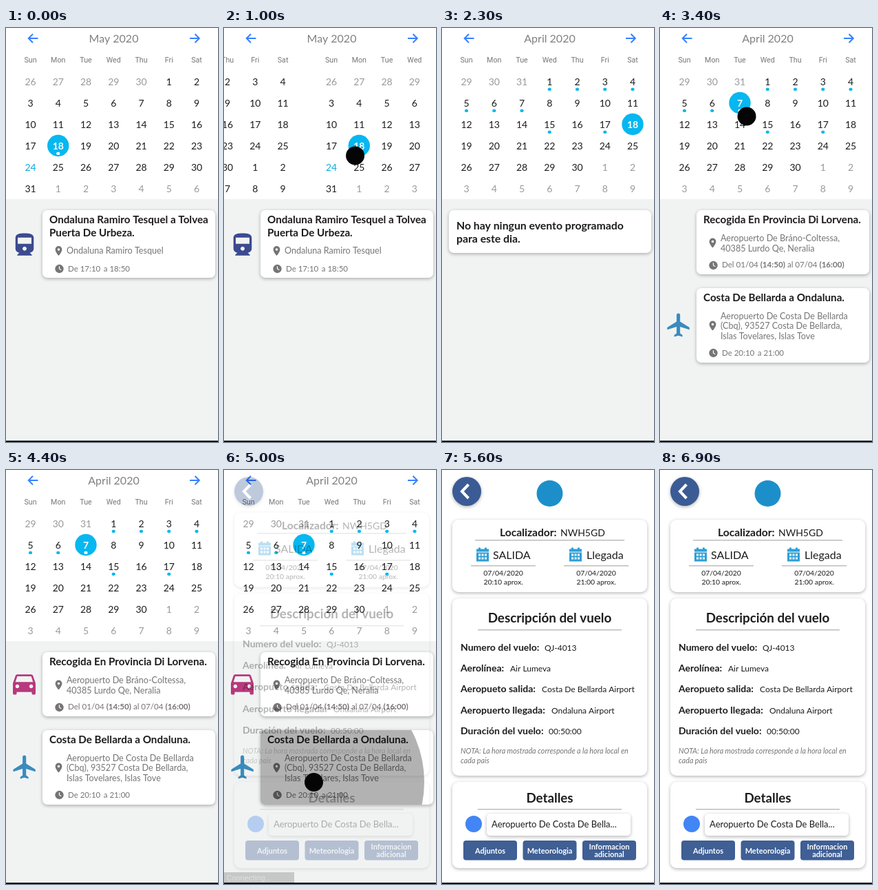
Animation of 308x600 px, one loop 7100 ms. Source, as an HTML page with a canvas:

```html
<!DOCTYPE html>
<html lang="es">
<head>
<meta charset="utf-8">
<title>Agenda de viajes</title>
<style>
  html, body { margin: 0; width: 308px; height: 600px; overflow: hidden; background: #fff; }
  canvas { position: absolute; left: 0; top: 0; }
</style>
</head>
<body>
<canvas id="agenda" width="308" height="600"></canvas>
<canvas id="detail" width="308" height="600"></canvas>
<script>
const LOOP = 7100, STEP = 100, PAGE = 312;
const CYAN = '#06b7f0', GREY = '#757575', INK = '#1c1c1c', NAVY = '#3f5f95';
const agenda = document.getElementById('agenda').getContext('2d');
const detail = document.getElementById('detail').getContext('2d');
let c = agenda;

const icons = {
  train: 'M12 2c-4.4 0-8 .5-8 4v9.5C4 17.4 5.6 19 7.5 19L5.5 21v.5h13V21l-2-2c1.9 0 3.5-1.6 3.5-3.5V6c0-3.5-3.6-4-8-4zM6 5.8h12v5.4H6zM12 13.7a1.8 1.8 0 1 0 .01 0z',
  car: 'M18.9 6c-.2-.6-.8-1-1.4-1h-11c-.7 0-1.2.4-1.4 1L3 12v8c0 .6.4 1 1 1h1c.6 0 1-.4 1-1v-1h12v1c0 .6.4 1 1 1h1c.6 0 1-.4 1-1v-8zM6.5 13a1.5 1.5 0 1 0 .01 0zM17.5 13a1.5 1.5 0 1 0 .01 0zM5 11l1.5-4.5h11L19 11z',
  plane: 'M21 16v-2l-8-5V3.5a1.5 1.5 0 0 0-3 0V9l-8 5v2l8-2.5V19l-2 1.5V22l3.5-1 3.5 1v-1.5L13 19v-5.5z',
  pin: 'M12 2a7 7 0 0 0-7 7c0 5.2 7 13 7 13s7-7.8 7-13a7 7 0 0 0-7-7zM12 6.5a2.5 2.5 0 1 1-.01 0z',
  clock: 'M12 2a10 10 0 1 0 .01 0zM11 6h2v5.5l4 2.6-1 1.6-5-3.2z',
  calendar: 'M3 4h3V2h3v2h6V2h3v2h3v4H3zM3 9h18v13H3zM6 11h3v3H6zM10.5 11h3v3h-3zM15 11h3v3h-3zM6 16h3v3H6zM10.5 16h3v3h-3zM15 16h3v3h-3z'
};

function icon(name, x, y, scale, color) {
  c.save();
  c.translate(x, y);
  c.scale(scale, scale);
  c.translate(-12, -12);
  c.fillStyle = color;
  c.fill(new Path2D(icons[name]), 'evenodd');
  c.restore();
}

function text(str, x, y, size, color = INK, style = '', align = 'left', family = 'Lato') {
  c.font = `${style} ${size}px ${family}, sans-serif`;
  c.fillStyle = color;
  c.textAlign = align;
  c.fillText(str, x, y);
  return x + c.measureText(str).width;
}

function rect(x, y, w, h, color) {
  c.fillStyle = color;
  c.fillRect(x, y, w, h);
}

function disc(x, y, r, color) {
  c.fillStyle = color;
  c.beginPath();
  c.arc(x, y, r, 0, 7);
  c.fill();
}

function stroke(points, color, width) {
  c.strokeStyle = color;
  c.lineWidth = width;
  c.stroke(new Path2D(points));
}

function box(x, y, w, h, r, color) {
  c.fillStyle = color;
  c.beginPath();
  c.roundRect(x, y, w, h, r);
  c.fill();
}

function shadowed(draw) {
  c.save();
  c.shadowColor = 'rgba(0,0,0,.3)';
  c.shadowBlur = 5;
  c.shadowOffsetY = 1.5;
  draw();
  c.restore();
}

const card = (x, y, w, h, r = 7) => shadowed(() => box(x, y, w, h, r, '#fff'));
const smooth = p => (p = Math.min(1, Math.max(0, p)), p * p * (3 - 2 * p));

// month is zero-based; a page that is not ready has no grey days
function monthPage(x0, month, { selected, dots = [], marked, today, ready = true }) {
  const lead = new Date(2020, month, 1).getDay();
  ['Sun', 'Mon', 'Tue', 'Wed', 'Thu', 'Fri', 'Sat'].forEach((name, i) =>
    text(name, x0 + 35.5 + 40.25 * i, 50, 10.7, '#777', '', 'center', 'Roboto'));
  for (let i = 0; i < 42; i++) {
    const date = new Date(2020, month, 1 - lead + i), day = date.getDate();
    const own = date.getMonth() === month;
    const x = x0 + 35.5 + 40.25 * (i % 7), y = 78 + 31 * Math.floor(i / 7);
    const on = own && day === selected;
    if (on) disc(x, y - .5, 15.7, CYAN);
    const color = on ? '#fff' : !own && ready ? '#999' : own && day === today ? '#0ba9dc' : INK;
    text(day, x, y + 5.3, 14, color, on ? 'bold' : '', 'center');
    if (on ? marked : own && dots.includes(day)) box(x - 2.5, y + 8.7, 5, 4.4, 1.8, on ? '#fff' : CYAN);
  }
}

function header(title) {
  text(title, 156.5, 20.5, 16, '#808080', '', 'center');
  stroke('M46.5 15H33M39 8.7L32.7 15L39 21.3', '#3880ff', 2);
  stroke('M267 15H280.5M274.5 8.7L280.8 15L274.5 21.3', '#3880ff', 2);
}

function eventCard(y, h, titles, address, pinY, addressY, clockY) {
  card(53, y, 251, h);
  titles.forEach((line, i) => text(line, 63, y + 19 + 18.5 * i, 15.2, INK, 'bold'));
  icon('pin', 76.5, pinY, .7, GREY);
  address.forEach((line, i) => text(line, 88, addressY + 14.6 * i, 12.6, GREY));
  icon('clock', 77.5, clockY, .62, GREY);
}

function hours(from, to, y) {
  text('De ' + from, 90, y, 11.5, GREY);
  text('a ' + to, 180, y, 11.5, GREY, '', 'right');
}

function trainCard() {
  icon('train', 27, 314, 1.66, '#3c4a8f');
  eventCard(264, 98, ['Ondaluna Ramiro Tesquel a Tolvea', 'Puerta De Urbeza.'],
    ['Ondaluna Ramiro Tesquel'], 323, 327.3, 349);
  hours('17:10', '18:50', 352.7);
}

function emptyCard() {
  card(10, 264, 294, 62);
  text('No hay ningun evento programado', 21, 291.5, 15.8, INK, 'bold');
  text('para este dia.', 21, 310.5, 15.8, INK, 'bold');
}

function tripCards(t) {
  if (t >= 3500) icon('car', 26.5, 309, 1.83, '#b8397d');
  eventCard(264, 93, ['Recogida En Provincia Di Lorvena.'],
    ['Aeropuerto De Bráno-Coltessa,', '40385 Lurdo Qe, Neralia'], 311.5, 309.3, 344);
  let x = 90;
  [['Del 01/04 ', ''], ['(14:50)', 'bold'], [' al 07/04 ', ''], ['(16:00)', 'bold']]
    .forEach(([part, style]) => x = text(part, x, 347.3, 11.6, GREY, style));

  icon('plane', 27.5, 430.5, 1.7, '#3a8bbd');
  eventCard(377, 108, ['Costa De Bellarda a Ondaluna.'],
    ['Aeropuerto De Costa De Bellarda', '(Cbq), 93527 Costa De Bellarda,', 'Islas Tovelares, Islas Tove'],
    431.5, 421.7, 471);
  hours('20:10', '21:00', 474.7);

  if (t > 4800) {
    c.save();
    c.beginPath();
    c.roundRect(53, 377, 251, 108, 7);
    c.clip();
    disc(131, 452, (t - 4800) * .8, 'rgba(0,0,0,.3)');
    c.restore();
  }
}

function cursor(t, offset) {
  let x, y, alpha = 1;
  if (t >= 500 && t < 1300) {
    x = 70 + offset;
    y = 185;
  } else if (t >= 2500 && t < 3800) {
    const p = smooth((t - 2500) / 600);
    x = 200 - 74 * p;
    y = 336 - 208 * p;
    alpha = Math.min(1, (3800 - t) / 300);
  } else if (t >= 4800 && t < 5400) {
    x = 130.5;
    y = 452.5;
  } else return;
  c.globalAlpha = alpha;
  disc(x, y, 13.5, '#050505');
  c.globalAlpha = 1;
}

function drawAgenda(t) {
  c = agenda;
  rect(0, 0, 308, 600, '#f1f3f3');
  rect(0, 0, 308, 248, '#fff');
  const offset = PAGE * smooth((t - 500) / 1180);
  header(t < 1700 ? 'May 2020' : 'April 2020');
  if (offset < PAGE) monthPage(offset, 4, { selected: t < 1400 ? 18 : 0, marked: true, today: 24 });
  if (offset > 0) monthPage(offset - PAGE, 3, {
    selected: t < 1900 ? 0 : t < 3200 ? 18 : 7,
    marked: t >= 3200,
    dots: t < 2100 ? [] : [1, 2, 3, 4, 5, 6, 7, 15, 17],
    ready: t >= 1700
  });
  if (t < 1800) trainCard();
  else if (t < 3200) emptyCard();
  else if (t >= 3400) tripCards(t);
  cursor(t, offset);
  // keeps the back button opaque while the pages blend
  if (t >= 5100) disc(36, 31, 21, '#fff');
  rect(0, 598, 308, 2, '#111');
}

function drawDetail(loaded) {
  c = detail;
  // before the header picture arrives, the upper rows sit higher
  const Y = y => loaded ? y : y - Math.max(0, 420 - y) * .03;
  const rule = (x, y, w) => rect(x, Math.round(Y(y)), w, 1.5, '#bdbdbd');
  const panel = (top, bottom) => card(15, Y(top), 283, Y(bottom) - Y(top), 9);
  rect(0, 0, 308, 600, '#fff');

  shadowed(() => disc(36, 31, 21, '#3b5b95'));
  stroke('M38.5 21L29 31L38.5 41', '#fff', 4);
  if (loaded) disc(156.5, 34, 19, '#1c8fcb');

  panel(72, 177);
  text('Localizador:', 84, Y(95.5), 15.6, INK, 'bold');
  text('NWH5GD', 172, Y(95.5), 14);
  rule(48, 101, 217);
  [[59, 'SALIDA', 74, '20:10'], [194, 'Llegada', 210, '21:00']].forEach(([x, name, nameX, hour]) => {
    icon('calendar', x, Y(122.5), 1, '#2e9fd6');
    text(name, nameX, Y(129), 16);
    rule(x - 17, 138, 94);
    text('07/04/2020', x + 30, Y(153), 10.4, INK, '', 'center');
    text(hour + ' aprox.', x + 30, Y(165.5), 10.4, INK, '', 'center');
  });

  panel(186, 443);
  text('Descripción del vuelo', 156.5, Y(221), 18.8, INK, 'bold', 'center');
  rule(52, 231, 209);
  [['Numero del vuelo:', 'QJ-4013', 149],
   ['Aerolínea:', 'Air Lumeva', 99],
   ['Aeropueto salida:', 'Costa De Bellarda Airport', 145],
   ['Aeropuerto llegada:', 'Ondaluna Airport', 159],
   ['Duración del vuelo:', '00:50:00', 155]].forEach(([label, value, x], i) => {
    const y = Y(261.7 + 30.3 * i);
    text(label, 27, y, 14, INK, 'bold');
    text(value, x, y, 12);
  });
  text('NOTA: La hora mostrada corresponde a la hora local en', 27, 411, 10.7, GREY, 'italic');
  text('cada pais', 27, 425, 10.7, GREY, 'italic');

  panel(452, 577);
  text('Detalles', 156.5, 481.7, 18.8, INK, 'bold', 'center');
  rule(52, 491, 209);
  disc(46, 513, 12, '#4285f4');
  card(65, 498, 209, 32, 5);
  text('Aeropuerto De Costa De Bella...', 72, 517.7, 13);
  [['Adjuntos'], ['Meteorologia'], ['Informacion', 'adicional']].forEach((lines, i) => {
    const x = 31 + 86.5 * i;
    box(x, 537, 78, 28.5, 4, NAVY);
    lines.forEach((line, k) =>
      text(line, x + 39, (lines.length > 1 ? 550 : 555.5) + 11 * k, 11, '#fff', 'bold', 'center'));
  });
  if (!loaded) {
    rect(0, 583, 102, 15, '#777');
    text('Connecting...', 4, 595, 11, '#c4c4c4', '', 'left', 'Roboto');
  }
  rect(0, 598, 308, 2, '#111');
}

const start = performance.now();
function frame(now) {
  const t = Math.floor(Math.max(0, now - start) % LOOP / STEP) * STEP;
  const style = detail.canvas.style;
  drawAgenda(t);
  style.visibility = t >= 5000 ? 'visible' : 'hidden';
  if (t >= 5000) {
    drawDetail(t >= 5400);
    // both pages show through each other until the new one turns opaque
    style.mixBlendMode = t < 5300 ? 'multiply' : 'normal';
    style.opacity = t < 5300 ? Math.min(1, (t - 4900) / 300) : t < 5400 ? .85 : 1;
  }
  requestAnimationFrame(frame);
}
requestAnimationFrame(frame);
</script>
</body>
</html>
```
